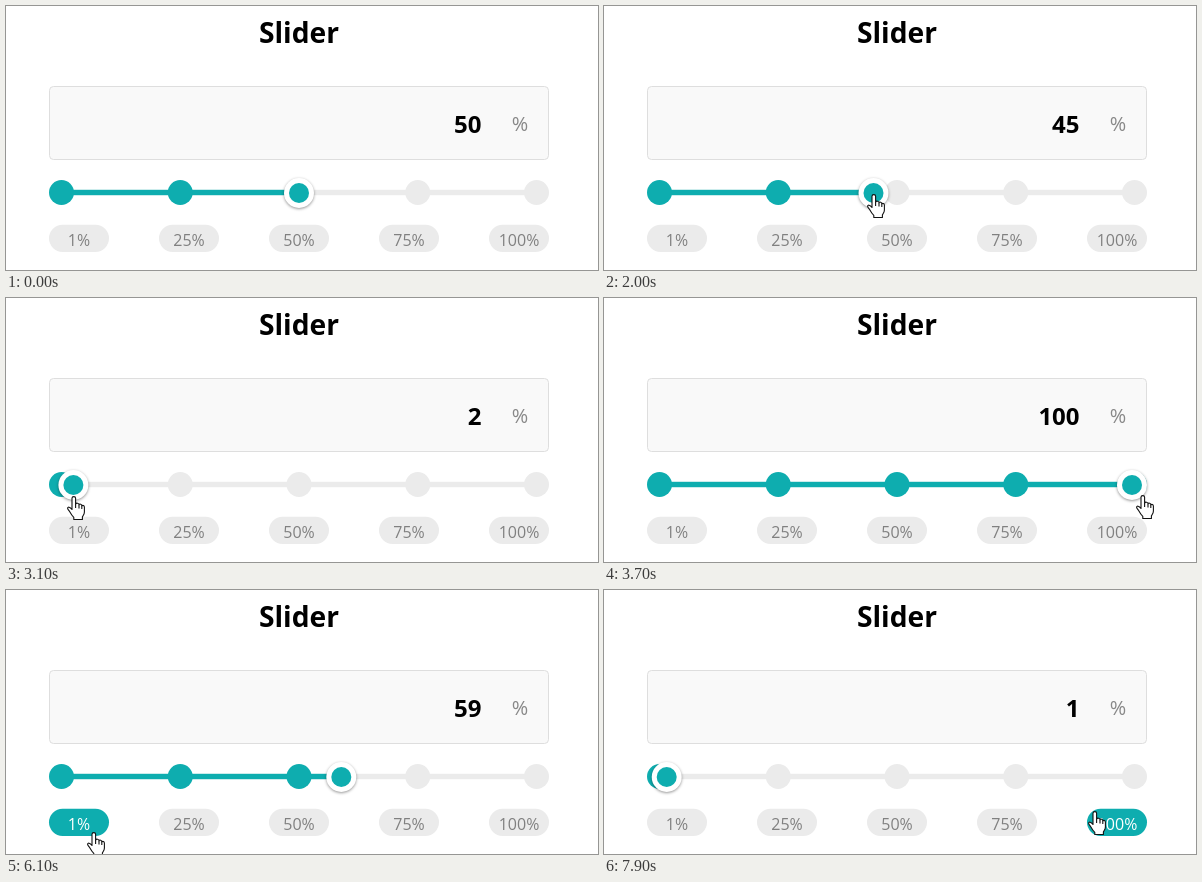
These frames come from a looping animation (592x264 px, 8 s). An HTML page with a canvas:

```html
<!DOCTYPE html>
<html lang="en">
<head>
<meta charset="utf-8">
<title>Slider</title>
<style>
  html, body { margin: 0; width: 100%; height: 100%; overflow: hidden; background: #fff; }
  canvas { display: block; width: 592px; height: 264px; }
</style>
</head>
<body>
<canvas id="stage" width="592" height="264"></canvas>
<script>
const ctx = document.getElementById('stage').getContext('2d');
const TEAL = '#0eadaf', GREY = '#ebebeb';
const FONT = '"Open Sans", "Noto Sans", sans-serif';
const STOPS = [1, 25, 50, 75, 100];
const LOOP = 8000, TICK = 100;

const linear = p => p;
const accelerate = p => p ** 2.6;
const inOut = p => p < .5 ? 4 * p ** 3 : 1 - 4 * (1 - p) ** 3;

// Pointer gestures; times are in ticks, and the pointer rests between them.
const ENTER = { at: 9, x: 239, y: 228 };
const MOVES = [
  { from: 9, to: 13, x: 292, y: 187 },
  { from: 19.05, to: 28.3, x: 64, y: 198 },
  { from: 30, to: 39, x: 560, y: 197, ease: inOut },
  { from: 45, to: 51, x: 60, y: 196, ease: accelerate },
  { from: 51, to: 53, x: 334, y: 197, ease: inOut },
  { from: 54, to: 60, x: 78, y: 238 },
  { from: 60, to: 61, x: 87, y: 242 },
  { from: 61, to: 63, x: 170, y: 234 },
  { from: 63, to: 67, x: 180, y: 230 },
  { from: 68, to: 72, x: 57, y: 237 },
  { from: 75, to: 79, x: 490, y: 221 }
];
const DRAG = { from: 19, to: 54, lag: .1 };
const CLICKS = [75, 65];

const HAND = new Path2D(
  'M5 13.5V2.3C5 .1 8.6 .1 8.6 2.3V8.2C9 6.6 12 6.9 12 8.7' +
  'C12.6 7.6 14.8 8 14.8 9.8C15.6 9 17.4 9.5 17.4 11.2V16' +
  'C17.4 18.6 15.8 19.8 15.4 21V23.5H6.8V21.4C5 19.6 3.6 17.2 2.6 15.4' +
  'C1.8 14 .6 13.4 .6 12.3C.7 10.6 3 10.6 5 13.5Z');
const KNUCKLES = new Path2D('M8.6 8V12M12 9V12.4M14.8 10V13');
const ARROW = new Path2D('M.5 .5V16.5L4.2 13L6.8 18.8L9.2 17.7L6.7 12H11.8Z');

const clamp = (v, lo, hi) => Math.min(hi, Math.max(lo, v));
const handleX = value => 58 + 4.7 * value;
const pillLeft = i => 43 + 110 * i;

function pointerAt(tick) {
  let { x, y } = ENTER;
  for (const move of MOVES) {
    const p = clamp((tick - move.from) / (move.to - move.from), 0, 1);
    const k = (move.ease || linear)(p);
    x += (move.x - x) * k;
    y += (move.y - y) * k;
  }
  return { x, y };
}

function pillUnder({ x, y }) {
  if (y < 219 || y > 246) return -1;
  return STOPS.findIndex((_, i) => x >= pillLeft(i) && x <= pillLeft(i) + 60);
}

function valueAt(tick) {
  const click = CLICKS.find(c => tick >= c);
  if (click) return STOPS[pillUnder(pointerAt(click))];
  const { x } = pointerAt(clamp(tick, DRAG.from, DRAG.to) - DRAG.lag);
  return clamp(Math.round((x - handleX(0)) / 4.7), 1, 100);
}

function disc(x, y, r, color) {
  ctx.fillStyle = color;
  ctx.beginPath();
  ctx.arc(x, y, r, 0, Math.PI * 2);
  ctx.fill();
}

function roundBox(x, y, w, h, r, color) {
  ctx.fillStyle = color;
  ctx.beginPath();
  ctx.roundRect(x, y, w, h, r);
  ctx.fill();
}

function label(text, x, y, size, color, weight = 400, align = 'center') {
  ctx.font = `${weight} ${size}px ${FONT}`;
  ctx.textAlign = align;
  ctx.fillStyle = color;
  ctx.fillText(text, x, y);
}

function drawField(value) {
  roundBox(43.5, 80.5, 499, 73, 4, '#f9f9f9');
  ctx.strokeStyle = '#dedede';
  ctx.lineWidth = 1;
  ctx.stroke();
  label(value, 475.5, 127, 24, '#000', 700, 'right');
  label('%', 514, 125, 20, '#888');
}

function drawTrack(value) {
  const x = handleX(value);
  ctx.fillStyle = GREY;
  ctx.fillRect(55, 183.8, 476, 5.4);
  ctx.fillStyle = TEAL;
  ctx.fillRect(55, 183.8, x - 55, 5.4);
  STOPS.forEach((stop, i) =>
    disc(55.5 + 118.75 * i, 186.5, 12.5, value >= stop ? TEAL : GREY));
  ctx.save();
  ctx.shadowColor = 'rgba(0,0,0,.42)';
  ctx.shadowBlur = 3;
  ctx.shadowOffsetY = 1;
  disc(x, 187, 15, '#fff');
  ctx.restore();
  disc(x, 187, 10, TEAL);
}

function drawPills(hovered) {
  STOPS.forEach((stop, i) => {
    const hot = i === hovered;
    roundBox(pillLeft(i), 218.7, 60, 27.2, 13.6, hot ? TEAL : GREY);
    label(stop + '%', pillLeft(i) + 30, 240, 16, hot ? '#fff' : '#808080');
  });
}

function drawPointer({ x, y }, hand) {
  const shape = hand ? HAND : ARROW;
  ctx.save();
  ctx.translate(Math.round(x) - (hand ? 6 : 0), Math.round(y));
  ctx.fillStyle = '#fff';
  ctx.strokeStyle = '#111';
  ctx.lineWidth = 1.1;
  ctx.lineJoin = 'round';
  ctx.fill(shape);
  ctx.stroke(shape);
  if (hand) ctx.stroke(KNUCKLES);
  ctx.restore();
}

function draw(now) {
  const tick = Math.floor(now % LOOP / TICK);
  const value = valueAt(tick);
  const pointer = pointerAt(tick);
  const visible = tick >= ENTER.at;
  const hovered = visible ? pillUnder(pointer) : -1;
  ctx.fillStyle = '#fff';
  ctx.fillRect(0, 0, 592, 264);
  label('Slider', 293, 37, 28.2, '#000', 700);
  drawField(value);
  drawTrack(value);
  drawPills(hovered);
  if (visible) drawPointer(pointer, hovered >= 0 || pointer.y <= 202);
}

const start = performance.now();
function loop() {
  draw(performance.now() - start);
  requestAnimationFrame(loop);
}
loop();
</script>
</body>
</html>
```
